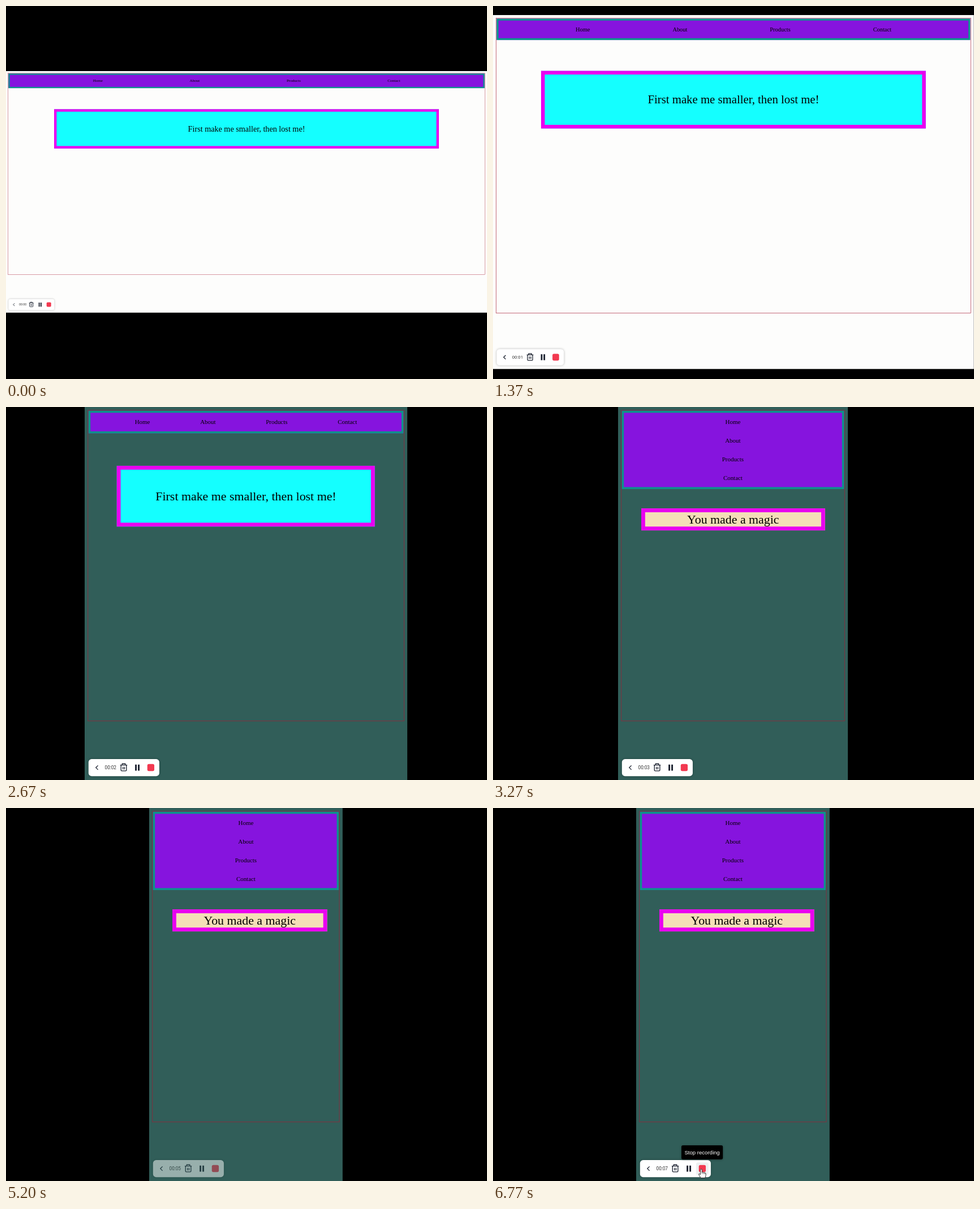
Write an HTML page that moves like this. It is 850 px wide and 659 px high and loops after 6940 ms.

```html
<!DOCTYPE html>
<html lang="en">
<head>
<meta charset="utf-8">
<title>Responsive resize</title>
<style>
  * { box-sizing: border-box; }
  html, body { margin: 0; width: 100%; height: 100%; overflow: hidden; background: #000; }
  #page {
    position: absolute; height: 964px; overflow: hidden;
    transform-origin: 0 0; background: #fdfdfc; color: #000;
    font: 16px/18px "Liberation Serif", "Times New Roman", serif;
  }
  #frame {
    position: absolute; left: 8px; right: 8px; top: 8px; height: 804px;
    padding: 1px; border: 1px solid #a81c34;
  }
  nav {
    display: flex; justify-content: space-evenly;
    border: 5px solid #0b948b; background: #8614de;
  }
  nav span { padding: 15px; text-align: center; }
  #box {
    position: absolute; top: 152px; width: 80%; padding: 50px 0;
    border: 10px solid #e902f0; background: #14ffff;
    font-size: 32px; line-height: 37px; text-align: center; white-space: nowrap;
  }
  .dark { background: #315e59 !important; }
  .narrow nav { flex-direction: column; }
  .narrow #box { top: 262px; padding: 0; background: #f4dfb7; }
  #bar {
    position: absolute; left: 10px; top: 910px; width: 183px; height: 44px;
    border-radius: 8px; background: #fff; box-shadow: 0 0 7px rgba(0, 0, 0, .28);
  }
  #bar svg { position: absolute; left: 0; top: 0; }
  #timer {
    position: absolute; left: 42px; top: 13px; color: #333;
    font: 12px/18px Roboto, sans-serif;
  }
  #tip {
    position: absolute; left: 117px; top: 872px; width: 107px; height: 36px;
    border-radius: 4px; background: #000; color: #fff; white-space: nowrap;
    font: 14px/36px "Liberation Sans", Arial, sans-serif; text-align: center;
    box-shadow: 0 1px 5px rgba(0, 0, 0, .4);
  }
  #hand { position: absolute; left: 0; top: 0; }
</style>
</head>
<body>
<div id="page">
  <div id="frame">
    <nav><span>Home</span><span>About</span><span>Products</span><span>Contact</span></nav>
  </div>
  <div id="box"></div>
  <div id="bar">
    <svg width="183" height="44" fill="none" stroke="#1c2230" stroke-width="2">
      <rect id="hover" x="145" y="6" width="32" height="32" rx="5" fill="#edf0f1" stroke="none"/>
      <path d="M24.500 16.500l-5.500 5.500 5.500 5.500"/>
      <path d="M82 15.500h18M87 15v-3h8v3M84 16v12.500q0 2 2 2h10q2 0 2-2V16M89 20v6.500M93 20v6.500"/>
      <path d="M122.500 14v16M129.800 14v16" stroke-width="4.300"/>
      <rect x="152" y="12.500" width="18" height="18.500" rx="4" fill="#f23950" stroke="none"/>
    </svg>
    <span id="timer"></span>
  </div>
  <div id="tip">Stop recording</div>
  <svg id="hand" width="22" height="26" viewBox="-8 -1 22 26">
    <path d="M-2 1.500q2-2.500 4 0v7q2-1.500 3.500.500 2-1 3.500 1 2.500-.500 3 2v5l-2 6H-1l-5-8q-1-3 1.500-2.500l2.500 2z"
      fill="#fff" stroke="#222" stroke-width="1.300" stroke-linejoin="round"/>
    <path d="M2 8.500v4M5.500 9.500v3.500M9 10.500v3" stroke="#222"/>
  </svg>
</div>
<script>
const LOOP = 6940, STAGE_W = 850, STAGE_H = 659, VIEW_H = 964;
const $ = id => document.getElementById(id);

// [ms, viewport width]
const widths = [
  [570, 1920], [1230, 1398], [1370, 1311], [1930, 972],
  [2630, 839], [2670, 834], [3270, 594], [3330, 569], [3630, 500]
];

const clamp = x => Math.min(1, Math.max(0, x));
const ramp = (t, from, to) => clamp((t - from) / (to - from));
const mix = (a, b, k) => a + (b - a) * k;

const slopes = widths.slice(1).map(([t, w], i) => (w - widths[i][1]) / (t - widths[i][0]));
const tangent = i => {
  const a = slopes[i - 1], b = slopes[i];
  return a && b ? 2 * a * b / (a + b) : 0;
};

// Monotone cubic through the width table
function widthAt(t) {
  const last = widths.length - 1;
  if (t <= widths[0][0]) return widths[0][1];
  if (t >= widths[last][0]) return widths[last][1];
  const i = widths.findIndex(p => p[0] > t) - 1;
  const [t0, w0] = widths[i], [t1, w1] = widths[i + 1];
  const d = t1 - t0, k = (t - t0) / d, r = 1 - k;
  return r * r * (1 + 2 * k) * w0 + k * k * (3 - 2 * k) * w1
    + d * k * r * (r * tangent(i) - k * tangent(i + 1));
}

// Letterbox offset on whole pixels
const inset = (stage, size) => Math.max(0, Math.floor((stage - size - 1) / 2));

function layout(w) {
  const scale = Math.min(STAGE_W / w, STAGE_H / VIEW_H);
  const x = inset(STAGE_W, w * scale), y = inset(STAGE_H, VIEW_H * scale);
  const narrow = w <= 768;
  const page = $("page");
  page.style.width = w + "px";
  page.style.transform = `translate(${x}px, ${y}px) scale(${scale})`;
  page.classList.toggle("dark", w <= 1024);
  page.classList.toggle("narrow", narrow);
  $("box").style.left = Math.max(60, w / 10) + "px";
  $("box").textContent = narrow ? "You made a magic" : "First make me smaller, then lost me!";
}

function recorder(t) {
  const secs = Math.floor((t + 230) / 1000);
  $("timer").textContent = "00:0" + secs;
  $("bar").style.opacity = 1 - .5 * ramp(t, 4000, 4300) + .5 * ramp(t, 5730, 5930);
  $("hover").style.opacity = ramp(t, 5950, 6100);
  $("tip").style.opacity = ramp(t, 6050, 6250);

  const k = ramp(t, 5730, 6000), ease = k * (2 - k);
  const x = t < 6470 ? mix(215, 180, ease) : 168;
  const y = t < 6470 ? mix(880, 925, ease) : 932;
  $("hand").style.visibility = t < 5730 ? "hidden" : "visible";
  $("hand").style.transform = `translate(${x - 8}px, ${y}px)`;
}

const start = performance.now();
function draw() {
  const t = (performance.now() - start) % LOOP;
  layout(widthAt(t));
  recorder(t);
  requestAnimationFrame(draw);
}
draw();
</script>
</body>
</html>
```
